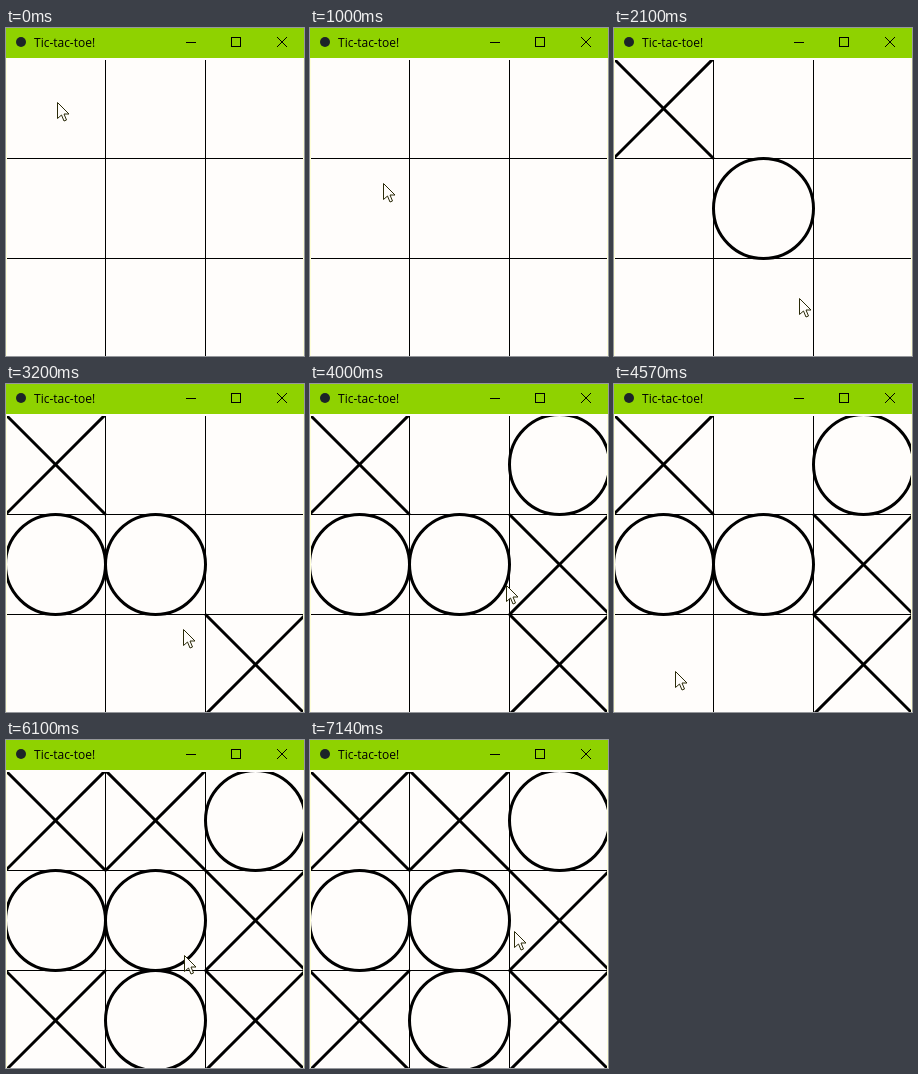
Write an HTML page with a canvas that moves like this. It is 298x328 px and loops after 7.48 s.

```html
<!DOCTYPE html>
<html lang="en">
<head>
<meta charset="utf-8">
<title>Tic-tac-toe!</title>
<style>
html, body { margin: 0; width: 298px; height: 328px; overflow: hidden; background: #fffdfb; }
canvas { display: block; }
</style>
</head>
<body>
<canvas id="stage" width="298" height="328"></canvas>
<script>
const ctx = document.getElementById('stage').getContext('2d');
const LOOP = 7480;
const PAPER = '#fffdfb';

// X and O take turns; each reply appears together with the move before it
const cells = [0, 4, 8, 3, 5, 2, 6, 7, 1];
const turns = [1240, 2620, 3640, 4720, 5400];

// where the pointer comes to rest: [arrival, x, y]
const stops = [
  [0, 51, 74], [1000, 73, 155], [2090, 185, 270], [2500, 232, 281],
  [3200, 177, 245], [3620, 236, 176], [4570, 61, 287], [5140, 128, 40],
  [5300, 137, 131], [5750, 180, 211], [6300, 160, 248], [7120, 204, 191]
];

const ease = u => u * u * (3 - 2 * u);

// longer trips take longer, but never start before the last one ends
function pointerAt(t) {
  let [last, x, y] = stops[0];
  for (const [end, nx, ny] of stops.slice(1)) {
    const trip = 100 + 3.5 * Math.hypot(nx - x, ny - y);
    const begin = Math.max(last, end - trip);
    if (t < begin) break;
    const k = ease(Math.min(1, (t - begin) / (end - begin)));
    x += (nx - x) * k;
    y += (ny - y) * k;
    if (t < end) break;
    last = end;
  }
  return [Math.round(x), Math.round(y)];
}

function line(x1, y1, x2, y2) {
  ctx.beginPath();
  ctx.moveTo(x1, y1);
  ctx.lineTo(x2, y2);
  ctx.stroke();
}

function cross(x, y, r) {
  line(x - r, y - r, x + r, y + r);
  line(x + r, y - r, x - r, y + r);
}

function ring(x, y, r) {
  ctx.beginPath();
  ctx.arc(x, y, r, 0, Math.PI * 2);
  ctx.stroke();
}

function drawTitleBar() {
  ctx.fillStyle = '#8fd200';
  ctx.fillRect(0, 0, 298, 30);
  ctx.fillStyle = '#1c2428';
  ctx.beginPath();
  ctx.arc(15, 14, 5, 0, Math.PI * 2);
  ctx.fill();
  ctx.fillStyle = '#000';
  ctx.font = '12px "Open Sans", "Noto Sans", sans-serif';
  ctx.fillText('Tic-tac-toe!', 28, 19);
  ctx.lineWidth = 1;
  line(180, 14.5, 190, 14.5);
  ctx.strokeRect(225.5, 9.5, 9, 9);
  cross(276, 14, 5);
}

function drawBoard(t) {
  ctx.save();
  ctx.beginPath();
  ctx.rect(1, 32, 296, 296);
  ctx.clip();
  ctx.lineWidth = 1;
  for (const k of [0, 100]) {
    line(99.5 + k, 32, 99.5 + k, 328);
    line(0, 130.5 + k, 298, 130.5 + k);
  }
  ctx.lineWidth = 3;
  cells.forEach((cell, i) => {
    if (t < turns[i >> 1]) return;
    const mark = i % 2 ? ring : cross;
    mark(49.5 + cell % 3 * 100, 80.5 + Math.floor(cell / 3) * 100, 50);
  });
  ctx.restore();
}

function drawPointer(x, y) {
  ctx.save();
  ctx.translate(x + 0.5, y + 0.5);
  const arrow = new Path2D('M0 0V16L4 12.5 6.5 18.5 9 17.5 6.5 11.5H11.5Z');
  ctx.fillStyle = PAPER;
  ctx.strokeStyle = '#2a2a08';
  ctx.lineWidth = 1;
  ctx.fill(arrow);
  ctx.stroke(arrow);
  ctx.restore();
}

function render(t) {
  ctx.fillStyle = PAPER;
  ctx.fillRect(0, 0, 298, 328);
  ctx.fillStyle = '#ffffd8';
  ctx.fillRect(0, 30, 1, 298);
  ctx.fillRect(297, 30, 1, 298);
  ctx.strokeStyle = '#000';
  drawTitleBar();
  drawBoard(t);
  drawPointer(...pointerAt(t));
}

const start = performance.now();
function tick() {
  render((performance.now() - start) % LOOP);
  requestAnimationFrame(tick);
}
tick();
</script>
</body>
</html>
```
